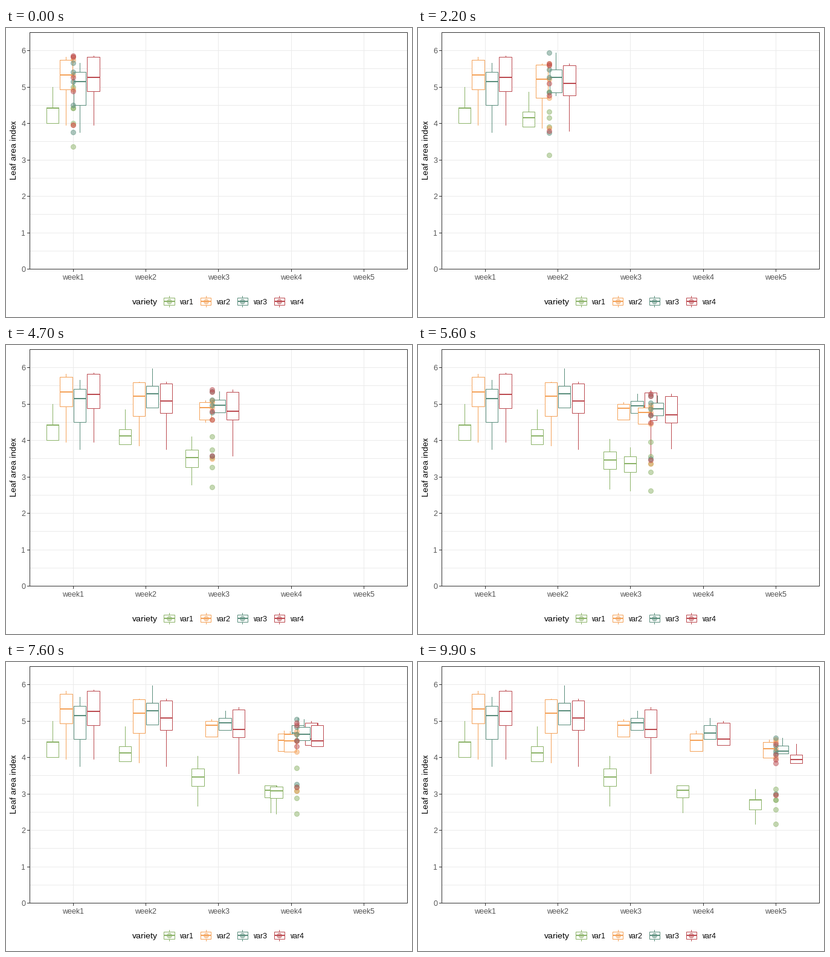
These frames come from a looping animation (672 px wide and 480 px high, 10 s). A matplotlib script:

```python
import numpy as np
import matplotlib.pyplot as plt
from matplotlib.animation import FuncAnimation
from matplotlib.patches import Circle, Rectangle

plt.rcParams.update({
    "font.family": "Liberation Sans",
    "text.hinting": "native",
    "text.hinting_factor": 1,
})

W, H, DPI = 672, 480, 96
PX = 72 / DPI  # one pixel in points
COLORS = ["#8CB369", "#F4A259", "#5B8E7D", "#BC4B51"]
GRID, FRAME, TICK_TEXT = "#EBEBEB", "#333333", "#4D4D4D"

LEFT, RIGHT, TOP, BOTTOM = 39.0, 664.67, 7.33, 400.6
UNIT_X = (RIGHT - LEFT) / 5.2
UNIT_Y = (BOTTOM - TOP) / 6.5
BOX_W = 0.16875 * UNIT_X

# LEAF[variety][week]: five sorted measurements
LEAF = np.array([
    [[3.35, 4.00, 4.42, 4.42, 5.00], [3.10, 3.88, 4.11, 4.30, 4.85],
     [2.67, 3.21, 3.46, 3.68, 4.03], [2.48, 2.90, 3.10, 3.23, 3.75],
     [2.17, 2.56, 2.82, 2.83, 3.13]],
    [[3.95, 4.93, 5.32, 5.74, 5.82], [3.86, 4.67, 5.20, 5.59, 5.61],
     [3.46, 4.56, 4.87, 5.00, 5.04], [3.09, 4.17, 4.46, 4.65, 4.73],
     [2.98, 3.98, 4.23, 4.42, 4.48]],
    [[3.75, 4.50, 5.15, 5.40, 5.66], [3.73, 4.90, 5.28, 5.49, 5.97],
     [3.56, 4.75, 4.94, 5.08, 5.28], [3.28, 4.50, 4.67, 4.88, 5.08],
     [2.99, 4.10, 4.16, 4.32, 4.53]],
    [[3.95, 4.88, 5.26, 5.82, 5.85], [3.76, 4.75, 5.07, 5.56, 5.61],
     [3.56, 4.55, 4.77, 5.30, 5.37], [3.19, 4.33, 4.49, 4.95, 5.00],
     [2.96, 3.84, 3.94, 4.07, 4.37]],
])
ARRIVAL = [0, 25, 49, 74, 99]  # step at which each week is reached
FRAMES = 100


def box_stats(v):
    """Whisker ends, quartiles and median; whiskers stop at 1.5 IQR."""
    reach = 1.5 * (v[3] - v[1])
    inside = v[(v >= v[1] - reach) & (v <= v[3] + reach)]
    return [inside[0], v[1], v[2], v[3], inside[-1]]


STATS = np.apply_along_axis(box_stats, 2, LEAF)


def snap(v):
    return np.floor(v) + 0.5


def x_at(week):
    return LEFT + (0.6 + week) * UNIT_X


def y_at(value):
    return BOTTOM - value * UNIT_Y


fig = plt.figure(figsize=(W / DPI, H / DPI), dpi=DPI, facecolor="white")
ax = fig.add_axes([0, 0, 1, 1])
ax.set(xlim=(0, W), ylim=(H, 0))
ax.axis("off")


def line(x0, y0, x1, y1, color, z):
    return ax.plot(snap(np.array([x0, x1])), snap(np.array([y0, y1])),
                   color=color, lw=PX, solid_capstyle="projecting",
                   snap=False, zorder=z)[0]


def rect(x0, y0, x1, y1, edge, face, z):
    x0, y0, x1, y1 = map(snap, (x0, y0, x1, y1))
    return ax.add_patch(Rectangle((x0, y0), x1 - x0, y1 - y0, ec=edge, fc=face,
                                  lw=PX, joinstyle="miter", snap=False, zorder=z))


def median_bar(x0, x1, y, color, z):
    x0, x1, y = np.floor(x0), np.floor(x1) + 1, np.floor(y)
    return ax.add_patch(Rectangle((x0, y - 1), x1 - x0, 2, fc=color, lw=0,
                                  snap=False, zorder=z))


def dot(x, y, color, z):
    return ax.add_patch(Circle((snap(x), snap(y)), 4, fc=color, ec=color,
                               alpha=0.5, lw=PX, zorder=z))


def box(x, ys, half, color, z):
    low, q1, mid, q3, high = ys
    parts = [line(x, a, x, b, color, z)
             for a, b in ((high, q3), (q1, low)) if abs(a - b) > 0.5]
    parts.append(rect(x - half, q3, x + half, q1, color, "white", z))
    parts.append(median_bar(x - half, x + half, mid, color, z))
    return parts


def label(x, y, s, pt, color="black", **kw):
    ax.text(x, y, s, fontsize=pt, color=color, **kw)


def draw_panel():
    for v in np.arange(0, 6.5, 0.5):
        line(LEFT, y_at(v), RIGHT, y_at(v), GRID, 1)
    for week in range(5):
        x = x_at(week)
        line(x, TOP, x, BOTTOM, GRID, 1)
        line(x, BOTTOM, x, BOTTOM + 3.6, FRAME, 8)
        label(x, 418, f"week{week + 1}", 9, TICK_TEXT, ha="center", va="baseline")
    for v in range(7):
        line(LEFT - 3.6, y_at(v), LEFT, y_at(v), FRAME, 8)
        label(32.4, np.floor(y_at(v)) + 5, str(v), 9, TICK_TEXT,
              ha="right", va="baseline")
    rect(LEFT, TOP, RIGHT, BOTTOM, FRAME, "none", 9)
    label(20, 203, "Leaf area index", 10.6, rotation=90, ha="right", va="center")


def draw_legend():
    label(209, 459, "variety", 10.6, va="baseline")
    for i, color in enumerate(COLORS):
        x, y = 270.4 + 60.75 * i, 454.2
        box(x, y + np.array([9.2, 5.8, 0, -5.8, -9.2]), 8.64, color, 3)
        dot(x, y, color, 4)
        label(x + 18, 459, f"var{i + 1}", 9, va="baseline")


draw_panel()
draw_legend()
moving = []


def draw_group(week, stats, z):
    for i, color in enumerate(COLORS):
        x = x_at(week) + (i - 1.5) * 0.1875 * UNIT_X
        moving.extend(box(x, y_at(stats[i]), BOX_W / 2, color, z + 0.1 * i))


def update(n):
    while moving:
        moving.pop().remove()
    pos = np.interp(n, ARRIVAL, range(5))
    k = min(int(pos), 3)
    t = pos - k
    for week, start in enumerate(ARRIVAL):
        if n >= start:
            draw_group(week, STATS[:, week], 3)
    draw_group(pos, STATS[:, k] * (1 - t) + STATS[:, k + 1] * t, 5)
    points = LEAF[:, k] * (1 - t) + LEAF[:, k + 1] * t
    for color, values in zip(COLORS, points):
        for v in values:
            moving.append(dot(x_at(pos), y_at(v), color, 7))
    return moving


anim = FuncAnimation(fig, update, frames=FRAMES, interval=100,
                     init_func=lambda: [], repeat=True, repeat_delay=0)
plt.show()
```
